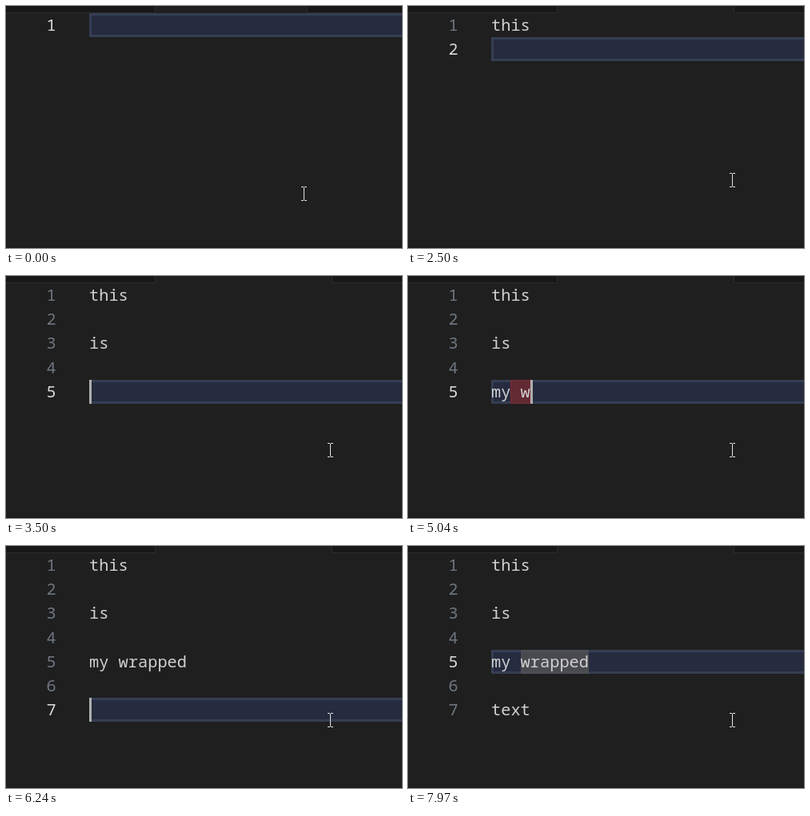
These frames come from a looping animation (495x303 px, 8000 ms). An HTML page with a canvas:

```html
<!DOCTYPE html>
<html lang="en">
<head>
<meta charset="utf-8">
<title>Typing in an editor</title>
<style>
  html, body { margin: 0; height: 100%; overflow: hidden; background: #1f1f1f; }
  canvas { display: block; }
</style>
</head>
<body>
<canvas id="stage" width="495" height="303"></canvas>
<script>
const WIDTH = 495, HEIGHT = 303, LOOP = 8000;
const LEFT = 104, CELL = 12.2, PITCH = 30.2;
const ctx = document.getElementById('stage').getContext('2d');

// Key presses and caret blinks, in ms
const EVENTS = [
  [670, 'on'], [1170, 'off'],
  [1440, 't'], [1570, 'h'], [1770, 'i'], [1900, 's'], [1970, 'enter'],
  [2500, 'off'], [2570, 'enter'],
  [2770, 'i'], [2900, 's'], [3300, 'enter'], [3500, 'enter'],
  [3770, 'm'], [4240, 'off'], [4370, 'y'], [4840, ' '],
  [5040, 'w'], [5240, 'r'], [5300, 'a'], [5440, 'p'], [5500, 'p'],
  [5700, 'e'], [5900, 'd'], [6100, 'enter'], [6240, 'enter'],
  [6700, 't'], [6770, 'e'], [6970, 'x'], [7170, 't'],
  [7300, 'up'], [7440, 'up'], [7970, 'off']
];

// Mouse and tab edge jump between positions: [from ms, ...value]
const MOUSE = [[0, 372, 235], [500, 376, 233], [570, 387, 227], [640, 398, 221], [700, 404, 219], [770, 405, 218]];
const TAB_EDGE = [[0, 376], [1500, 393], [1840, 407]];

const latest = (steps, t) => steps.filter(step => step[0] <= t).pop();
const rowTop = row => Math.round(9 + PITCH * row);
const colX = col => Math.round(LEFT + CELL * col);

function rect(color, x, y, w, h) {
  ctx.fillStyle = color;
  ctx.fillRect(x, y, w, h);
}

function text(color, string, x, row) {
  ctx.fillStyle = color;
  ctx.fillText(string, x, rowTop(row) + 22);
}

function editorAt(t) {
  const lines = [''];
  let row = 0, goal = 0, caret = false;
  for (const [time, key] of EVENTS) {
    if (time > t) break;
    caret = key !== 'off';
    if (key === 'enter') { lines.push(''); row++; goal = 0; }
    else if (key === 'up') row--;
    else if (key.length === 1) { lines[row] += key; goal++; }
  }
  return { lines, row, caret, col: Math.min(goal, lines[row].length) };
}

function drawTabs(t) {
  const edge = latest(TAB_EDGE, t)[1];
  rect('#181818', 0, 0, WIDTH, 8);
  rect('#2b2b2b', 0, 8, WIDTH, 1);
  rect('#1f1f1f', 187, 0, edge - 187, 9);
  rect('#2b2b2b', 186, 0, 1, 9);
  rect('#2b2b2b', edge, 0, 1, 9);
}

function drawActiveLine(row) {
  const y = rowTop(row), h = rowTop(row + 1) - y;
  rect('#343e53', LEFT, y, WIDTH - LEFT, h);
  rect('#262b40', LEFT + 3, y + 3, WIDTH - LEFT, h - 6);
}

function drawMarks(t, { row, col }) {
  const y = rowTop(row), h = rowTop(row + 1) - y;
  if (t >= 4840 && t < 5100) {
    const x = colX(2), w = colX(col) - x;
    rect('#7b2b32', x, y, w, h);
    rect('#622a33', x + 1, y + 1, w - 2, h - 2);
  }
  if (t >= 7700) rect('rgba(87,87,87,.72)', colX(3), y, colX(10) - colX(3), h);
}

function drawMouse(x, y) {
  const color = '#e4e4e4';
  rect(color, x, y - 8, 1, 16);
  for (const end of [y - 9, y + 8]) {
    rect(color, x - 3, end, 3, 1);
    rect(color, x + 1, end, 3, 1);
  }
}

function draw(t) {
  const editor = editorAt(t);
  const { lines, row, col, caret } = editor;
  rect('#1f1f1f', 0, 0, WIDTH, HEIGHT);
  rect('#1b1b1b', 0, 301, WIDTH, 2);
  drawTabs(t);
  drawActiveLine(row);
  drawMarks(t, editor);
  ctx.font = '20.33px "Noto Sans Mono", monospace';
  lines.forEach((line, i) => {
    text(i === row ? '#d8d8d8' : '#6e7681', i + 1, 50.4, i);
    text('#d0d0d0', line, LEFT, i);
  });
  if (caret) rect('#aeafad', colX(col), rowTop(row), 3, rowTop(row + 1) - rowTop(row));
  const [, x, y] = latest(MOUSE, t);
  drawMouse(x, y);
}

const start = performance.now();
function frame() {
  draw((performance.now() - start) % LOOP);
  requestAnimationFrame(frame);
}
frame();
</script>
</body>
</html>
```
